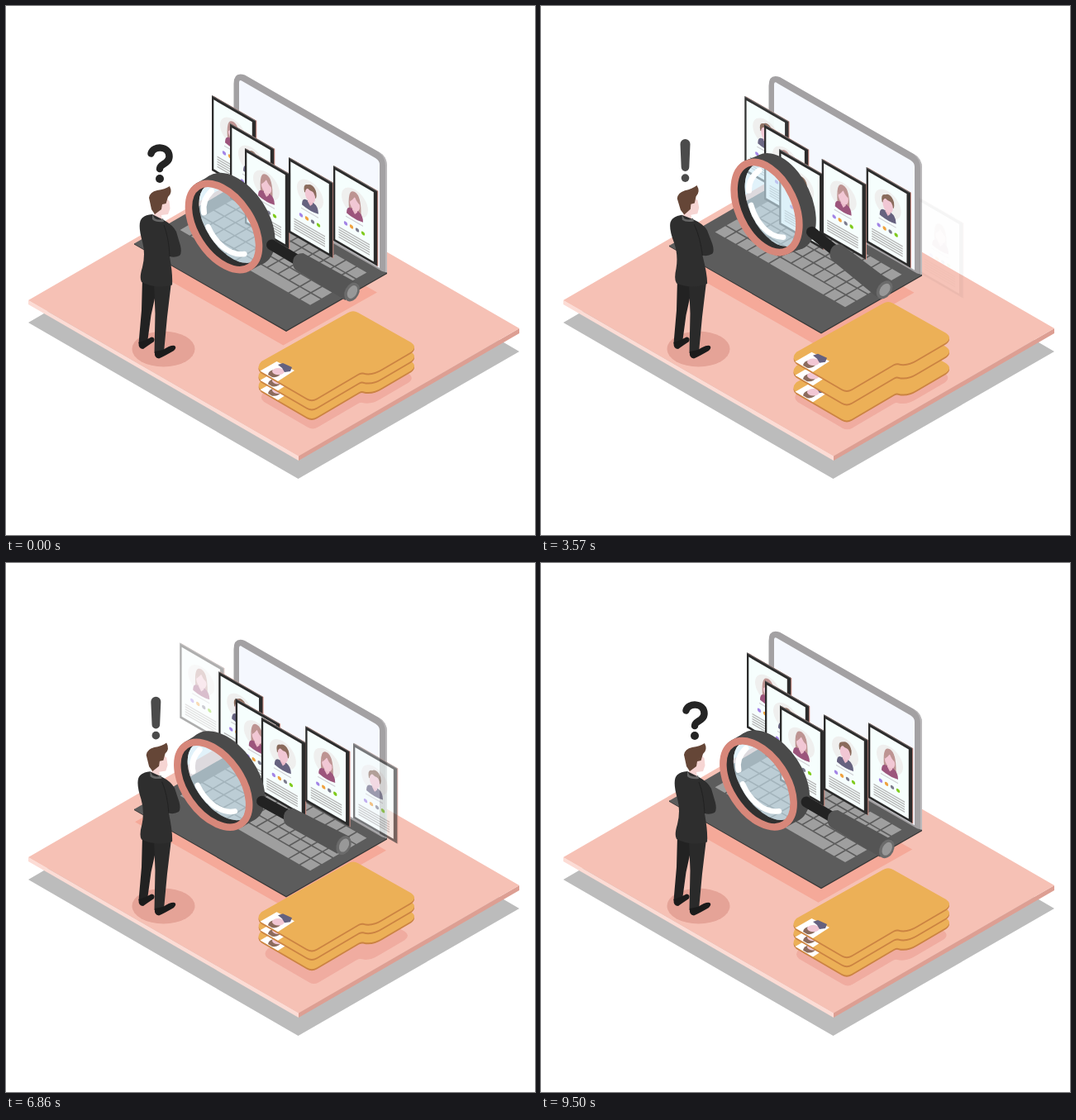
Recreate the animation shown at these times as an HTML page. Size 640x640 px, loop 9570 ms.

```html
<!DOCTYPE html>
<html lang="en">
<head>
<meta charset="utf-8">
<title>Choosing a candidate</title>
<style>
html, body { margin: 0; width: 100%; height: 100%; overflow: hidden; background: #fff; }
svg { display: block; width: 100%; height: 100%; }
</style>
</head>
<body>
<svg viewBox="0 0 640 640">
  <defs>
    <ellipse id="oval" rx="30.500" ry="54.200" transform="rotate(-33)"/>
    <clipPath id="hole"><use href="#oval"/></clipPath>
    <mask id="shell" maskUnits="userSpaceOnUse" x="-90" y="-90" width="190" height="180">
      <path d="M-90 -90H100V90H-90Z" fill="#fff"/>
      <g clip-path="url(#hole)"><use href="#oval" x="9" y="-4.500" fill="#000"/></g>
    </mask>
    <path id="sheet" d="M309 430L414 371Q420 367.500 426 371L490 407Q498 412.500 490 418.500L455 439Q443 446.500 432 443.500Q430 443 427 444.500L376 474.500Q370 478 364 474.500L309 442.500Q302 437 309 430Z"/>
    <g id="folder">
      <use href="#sheet" y="2" fill="#cb8342"/>
      <use href="#sheet" fill="#ecb057"/>
      <path d="M307.500 441.500L327.500 430L349 441L329 454Z" fill="#fff"/>
      <path d="M317 446Q318 440.500 325 440L333 444Q330 450 322 449Z" fill="#8b6b5d"/>
      <ellipse cx="329.500" cy="442" rx="7.500" ry="4.200" fill="#f1c7d4"/>
      <path d="M329 434L335 432L346 437L344 442L337 443L334 438Z" fill="#65617f"/>
    </g>
  </defs>

  <path d="M27 383L353.500 572L621 418L294 228Z" fill="#bcbcbc"/>
  <path d="M27 356V361L354 550V544Z" fill="#fcdcd5"/>
  <path d="M354 544V550L621 396V390Z" fill="#dd9f93"/>
  <path d="M27 356L354 544.500L621 390L294 201.500Z" fill="#f6c1b5"/>

  <path id="laptopShadow" d="M-154 -17.500L30 87.500L154 17.500L-30 -87.500Z" fill="#f5a999"/>

  <g id="laptop">
    <path d="M155 287V288.500L339 394L461 324V322L339 391Z" fill="#383838"/>
    <path d="M155 287.500L339 392.500L461 322.500L277 217Z" fill="#5c5c5c"/>
    <g id="keys" fill="#9f9f9f"></g>
    <path d="M275.500 218V94Q275.500 79 289 83.500L451 176.500Q461 182 461 194V322.500L455 321Z" fill="#a3a1a3"/>
    <path d="M452 178Q459 183 459 194V322H461V194Q461 182 451 176.500Z" fill="#bbb9bb"/>
    <path d="M282 218V93Q282 88 286 91L447 184Q452 187 452 192V317Z" fill="#f5f8fe"/>
    <g id="cards"></g>
  </g>

  <ellipse cx="190.500" cy="415" rx="38" ry="21.500" fill="#e5a397"/>
  <path d="M165 330L164 368L160.500 408L170.500 411L175.500 374L183 340Z" fill="#222"/>
  <path d="M160.500 407Q160 415 166 415Q170 412 179 406Q181 401 176 400.500L169 404Z" fill="#1b1b1b"/>
  <path d="M179 334L180.500 372L179.500 420L191 419L195 376L200 334Z" fill="#2a2a2a"/>
  <path d="M180 418Q179 426 185 426.500Q191 424 203 417Q207 413 204 411Q199 410 190 416Z" fill="#1b1b1b"/>
  <g id="torso">
    <path d="M184 234L193 232L197.500 236L198.500 245L196 252L188 253L189 260L178 258L180 245Z" fill="#f6d5d3"/>
    <path d="M173 232Q174 225 183 223Q192 222 198 218Q202 226 196 231L193.500 239L189 240L188 246L180 252L176 246Z" fill="#654637"/>
    <path d="M177 252Q165 253 162.500 260Q160 268 165 285Q169 300 165 316Q161 329 164 334Q182 343 201 337.500Q202 326 198 303Q204 305 210 302Q213 299 211 290L206 273Q202 265 191 259Z" fill="#2e2e2e"/>
    <path d="M177 252L180 257Q186 260 190 257L191 261Q181 262 177 258Z" fill="#666"/>
    <path d="M191 265Q197 280 198 303" fill="none" stroke="#222" stroke-width="1"/>
  </g>
  <g id="ask" fill="#242424">
    <path d="M-10.500 -11.500C-8 -21.500 11.500 -21 11.500 -8C11.500 1 0 1 0 7" fill="none" stroke="#242424" stroke-width="8.500" stroke-linecap="round"/>
    <circle cy="19" r="5"/>
  </g>
  <g id="tell" fill="#4b4b4b">
    <path d="M-6 -20A6 6 0 0 1 6 -20L4.800 8A4.800 4.800 0 0 1 -4.800 8Z"/>
    <circle cy="21" r="4.800"/>
  </g>

  <use id="folderShadow" href="#sheet" fill="#f0aca0"/>
  <use id="low" href="#folder"/>
  <use id="mid" href="#folder"/>
  <use id="top" href="#folder"/>

  <g id="glass">
    <g mask="url(#shell)">
      <path d="M-34 -52L-18 -61L50 43L34 52Z" fill="#4a4a4a"/>
      <ellipse rx="37" ry="62.500" transform="translate(16 -9) rotate(-33)" fill="#4a4a4a"/>
      <ellipse rx="37" ry="62" transform="rotate(-33)" fill="#303030"/>
    </g>
    <g clip-path="url(#hole)">
      <use href="#oval" x="9" y="-4.500" fill="#cfeaf7" fill-opacity=".62"/>
      <g fill="none" stroke="#fff" stroke-linecap="round">
        <path d="M-24 -17C-26 -27 -22 -36 -15 -43" stroke-width="7"/>
        <path d="M-19 0C-11 19 7 36 25 33" stroke-width="6.500"/>
      </g>
    </g>
    <ellipse rx="34" ry="58" transform="rotate(-33)" fill="none" stroke="#d7877a" stroke-width="8.500"/>
    <path d="M58 22L90 41" stroke="#222" stroke-width="13" stroke-linecap="round"/>
    <path d="M84 40Q86 32 96 32L163 69L147 89L88 53Q82 49 84 40Z" fill="#555"/>
    <ellipse rx="8.500" ry="12" transform="translate(155 79) rotate(27)" fill="#6b6b6b"/>
    <ellipse rx="5.500" ry="8.500" transform="translate(155.500 79) rotate(27)" fill="#989898"/>
  </g>
</svg>
<script>
const LOOP = 9570, STEP = LOOP / 2;
const $ = id => document.getElementById(id);
const set = (id, transform) => $(id).setAttribute('transform', transform);
const clamp = v => Math.max(0, Math.min(1, v));
const mix = (a, b, p) => a + (b - a) * p;
const ease = x => (1 - Math.cos(Math.PI * clamp(x))) / 2;
const wave = (t, peak) => Math.cos(2 * Math.PI * (t - peak) / LOOP);

// Keyboard: 5 rows of 12, with a long space bar in the front row
function key(col, row, span = 1) {
  const w = 13.25, h = 14, gap = .8;
  const at = (c, r) => {
    const a = c * w, b = r * h;
    return (209 + a + b) + ' ' + (271 + (a - b) * .577);
  };
  const x = gap / w, y = gap / h, c = col + span;
  return `<path d="M${at(col + x, row + y)}L${at(c - x, row + y)}L${at(c - x, row + 1 - y)}L${at(col + x, row + 1 - y)}Z"/>`;
}
let keys = key(5, 0, 5);
for (let row = 0; row < 5; row++)
  for (let col = 0; col < 12; col++)
    if (row || col < 5 || col > 9) keys += key(col, row);
$('keys').innerHTML = keys;

// Profile cards
const line = (x1, x2, y, c, w) => `<path d="M${x1} ${y}H${x2}" stroke="${c}" stroke-width="${w}"/>`;
function profile(woman) {
  const shirt = woman ? '#9c557c' : '#66627f', color = woman ? '#bd9492' : '#8a6b5c';
  const back = woman
    ? 'M19 41Q17 17 26 17Q34 17 33.500 41L30 42H22Z'
    : 'M19 31Q17 22 23 20Q27 16 31 19Q35 23 33 31Z';
  const fringe = woman
    ? 'M20 32Q20 18 26 18Q32 18 32 29Q28 28 26 23Q24 27 20 32Z'
    : 'M19.500 29Q18 21 26 19Q34 19 33 28L30 25Q25 26 22 24Z';
  return `<path d="${back}" fill="${color}"/>` +
    `<path d="M16 48Q16 39 22 39L30 38Q36 39 36 48Q26 51 16 48Z" fill="${shirt}"/>` +
    '<path d="M23 36H29V40L26 44L23 40Z" fill="#ecbccb"/><ellipse cx="26" cy="31.500" rx="6.200" ry="8" fill="#f1c7d4"/>' +
    `<path d="${fringe}" fill="${color}"/>`;
}
function card() {
  let s = '<path d="M1.500 -.500H54.300V91H51V2H1.500Z" fill="#d8958a"/><path d="M0 0H53.300V91H0Z" fill="#2b2b2b"/>' +
    line(0, 53, .4, '#777', .8) +
    '<path d="M2.300 4H48.800V88H2.300Z" fill="#f6fefd"/><circle cx="26" cy="30" r="16" fill="#efefee"/>' +
    `<g class="w">${profile(true)}</g><g class="m">${profile(false)}</g>` +
    line(15, 36, 52.5, '#cdcdd2', 1.2);
  ['#a284e6', '#efa23f', '#7b7b8c', '#7fcb1c'].forEach((c, i) => s += `<circle cx="${15 + 7 * i}" cy="61.3" r="2.2" fill="${c}"/>`);
  for (let i = 0; i < 5; i++) s += line(6.5, 44, 70.5 + 3 * i, '#b5b5b5', 1.5);
  return `<g>${s}</g>`;
}
const STOPS = [[187, 73], [249, 108], [271, 142], [289, 172], [342, 183], [396, 193], [460, 231]];
$('cards').innerHTML = card().repeat(6);
const cards = [...$('cards').children];

// Smooth periodic curve through values at the given times
const TIMES = [0, 2290, 3570, 4710, 6140, 7570, LOOP];
function curve(vals) {
  const n = vals.length, val = i => vals[(i + n) % n];
  const rise = i => {
    const k = (i + n) % n;
    return (val(k + 1) - val(k)) / (TIMES[k + 1] - TIMES[k]);
  };
  const slope = i => {
    const a = rise(i - 1), b = rise(i);
    return a * b <= 0 ? 0 : 2 * a * b / (a + b);
  };
  return t => {
    let i = 0;
    while (t >= TIMES[i + 1]) i++;
    const d = TIMES[i + 1] - TIMES[i], x = (t - TIMES[i]) / d, y = 1 - x;
    return val(i) * (1 + 2 * x) * y * y + val(i + 1) * (3 - 2 * x) * x * x +
      d * x * y * (slope(i) * y - slope(i + 1) * x);
  };
}
const lensX = curve([263.5, 280.5, 273, 262.5, 252.5, 250]);
const lensY = curve([267, 250.5, 243.5, 240.5, 259.5, 273]);
const lensTurn = curve([0, 7, 8, 8, 1.7, -4.3]);
const lean = curve([0, -4.5, -4.6, -4.6, -3.5, -.5]);

function draw(t) {
  const dy = 3.9 - 7 * wave(t, 1500);
  set('laptop', `translate(0 ${dy})`);
  set('laptopShadow', `translate(308 330.500) scale(${.915 + .0069 * dy})`);

  // Cards rest, then glide one stop along
  const step = t < STEP ? 0 : 1, p = ease((t - step * STEP - 670) / 3350);
  cards.forEach((el, i) => {
    const [a, b] = [STOPS[i], STOPS[i + 1]];
    el.setAttribute('transform', `matrix(1 .577 0 1 ${mix(a[0], b[0], p)} ${mix(a[1], b[1], p)})`);
    el.setAttribute('opacity', i === 0 ? p : i === 5 ? 1 - p : 1);
    const woman = (i + step) % 2 === 1;
    el.querySelector('.w').style.display = woman ? '' : 'none';
    el.querySelector('.m').style.display = woman ? 'none' : '';
  });

  const low = 500.5 - 6.5 * wave(t, 6900);
  set('top', `translate(0 ${472.5 - 6.6 * wave(t, 4750) - 479})`);
  set('mid', `translate(0 ${485.5 - 5.5 * wave(t, 5600) - 479})`);
  set('low', `translate(0 ${low - 479})`);
  set('folderShadow', `translate(400 464) scale(${.915 + (low - 494) * .0065}) translate(-400 -427)`);

  const tilt = lean(t);
  set('torso', `rotate(${tilt} 182 335)`);
  const ask = clamp((2350 - t) / 450) + clamp((t - 8350) / 450);
  const tell = Math.min(clamp((t - 2350) / 450), clamp((8350 - t) / 450));
  const x = 186 + 2.5 * tilt;
  set('ask', `translate(${x} ${190 + .3 * tilt}) scale(${ask})`);
  set('tell', `translate(${x} ${188 + .2 * tilt}) scale(${tell})`);

  set('glass', `translate(${lensX(t)} ${lensY(t)}) rotate(${lensTurn(t)})`);
}

function tick() {
  draw(performance.now() % LOOP);
  requestAnimationFrame(tick);
}
tick();
</script>
</body>
</html>
```
